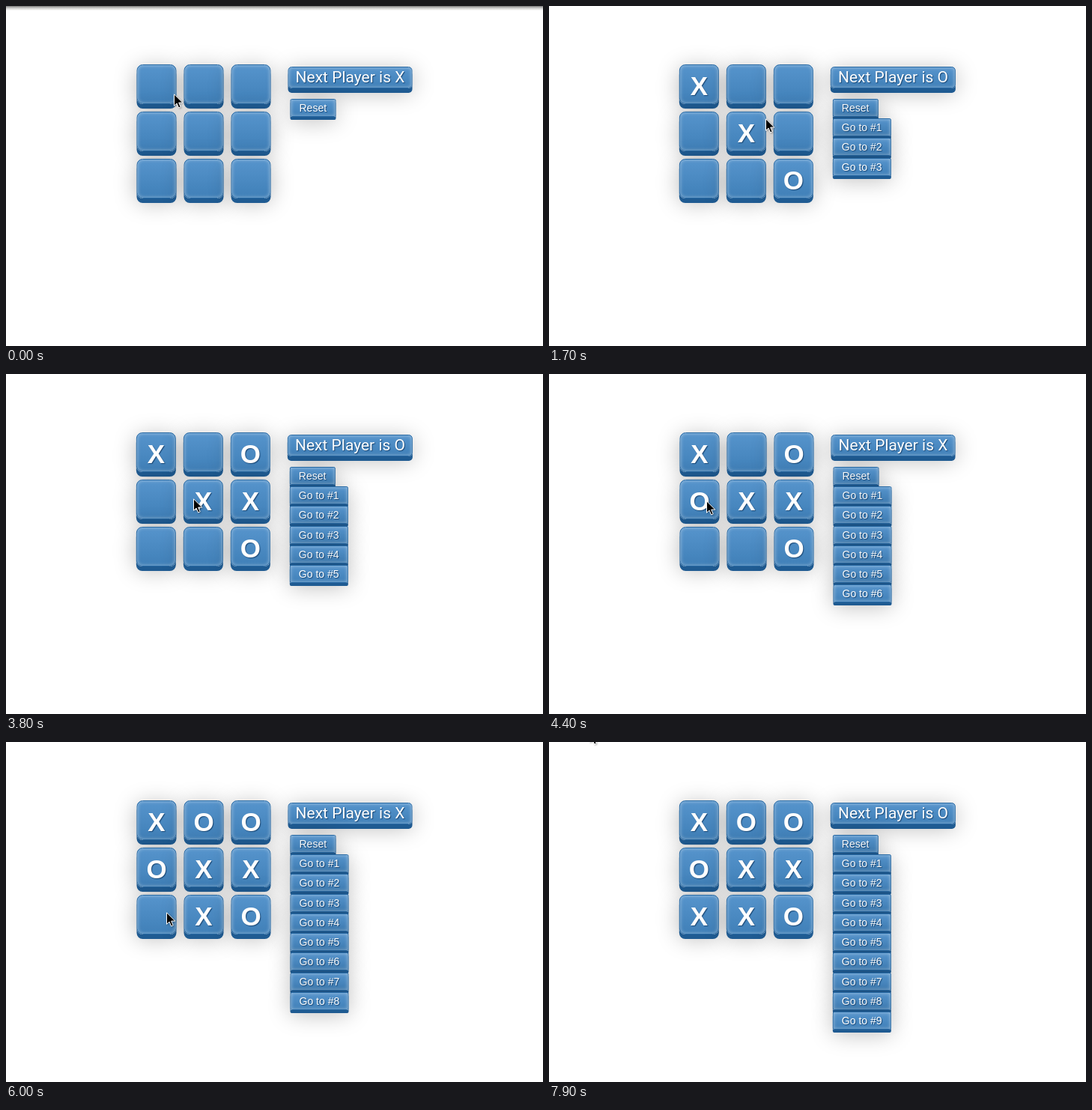
Write an HTML page that moves like this. It is 717 px wide and 454 px high and loops after 8000 ms.

```html
<!DOCTYPE html>
<html lang="en">
<head>
<meta charset="utf-8">
<title>Tic-tac-toe</title>
<style>
html, body { margin: 0; width: 100%; height: 100%; overflow: hidden; background: #fff; }
#stage { position: relative; width: 717px; height: 454px; overflow: hidden; }
#bar { position: absolute; width: 100%; height: 6px; background: linear-gradient(#777, #c4c4c4 40%, #fff); }
#game { position: absolute; left: 0; top: 0; }
#game div {
  position: absolute; box-sizing: border-box; color: #fff; text-align: center; white-space: nowrap;
  border: 1px solid #2668a3; background: linear-gradient(#5694cc, #4080b8);
  text-shadow: 1px 1px 1px #1c4a78;
  box-shadow: inset 0 0 5px rgba(255,255,255,.45), 0 var(--d) 0 #1f5b92, 0 5px 30px rgba(0,0,0,.28);
}
#game .cell { --d: 6px; width: 53px; height: 53px; border-radius: 8px; font: bold 35px/55px "Liberation Sans", Arial, sans-serif; }
#game .status { --d: 6px; left: 202px; top: 81px; height: 29px; border-radius: 5px; font: 21px/27px Roboto, sans-serif; }
#game .step { --d: 4px; left: 205px; height: 24px; padding: 0 11px; border-radius: 2px; font: 14px/22px "Liberation Sans", Arial, sans-serif; }
#cursor { position: absolute; left: 0; top: 0; overflow: visible; filter: drop-shadow(1px 1px 1px rgba(0,0,0,.3)); }
</style>
</head>
<body>
<div id="stage">
  <div id="bar"></div>
  <div id="game"></div>
  <svg id="cursor" width="13" height="20">
    <path d="M.5 .8V16.3L4.1 13L6.6 19L9.2 17.9L6.7 12.1H11.8Z" fill="#000" stroke="#fff"/>
  </svg>
</div>
<script>
const LOOP = 8000, TICK = 100, TRAVEL = 5;
const LEFT = 174, TOP = 78, PITCH = 63;
const $ = id => document.getElementById(id);

// pointer stops: tick of leaving, tip position, and whether it clicks there
const stops = [
  [0, 224, 117], [3, 196, 109, true], [10, 325, 242, true], [15, 270, 172, true],
  [21, 325, 110, true], [27, 275, 230], [35, 324, 160, true], [44, 210, 169, true],
  [48, 268, 230, true], [55, 264, 112, true], [61, 214, 227, true],
  [71, 370, 273], [80, 54, -16]
].map(([tick, x, y, click]) => ({ tick, x, y, click }));

// each click marks the cell under the pointer
const moves = stops.filter(s => s.click).map(({ tick, x, y }) => ({
  tick, cell: Math.floor((x - LEFT) / PITCH) + 3 * Math.floor((y - TOP) / PITCH)
}));

function add(cls, top, text = "") {
  const el = document.createElement("div");
  el.className = cls;
  el.style.top = top + "px";
  el.textContent = text;
  $("game").append(el);
  return el;
}

const cells = Array.from({ length: 9 }, (_, i) => {
  const el = add("cell", TOP + Math.floor(i / 3) * PITCH);
  el.style.left = i % 3 * PITCH + "px";
  return el;
});
const status = add("status", 81);
const steps = Array.from({ length: 10 }, (_, i) =>
  add("step", 123.9 + i * 26.25, i ? "Go to #" + i : "Reset"));

// leave a stop at its tick, ease to the next and wait there
function pointer(tick) {
  const i = stops.findIndex(s => s.tick > tick), a = stops[i - 1], b = stops[i];
  const u = Math.min(1, (tick - a.tick) / Math.min(TRAVEL, b.tick - a.tick));
  const k = u * u * (3 - 2 * u);
  return [a.x + (b.x - a.x) * k, a.y + (b.y - a.y) * k].map(Math.round);
}

let shown = -1;
function draw(now) {
  requestAnimationFrame(draw);
  const tick = Math.floor(now % LOOP / TICK);
  if (tick === shown) return;
  shown = tick;

  const played = moves.filter(m => m.tick <= tick);
  const marks = Array(9).fill("");
  played.forEach(({ cell }, i) => marks[cell] = "XO"[i % 2]);
  cells.forEach((el, i) => el.textContent = marks[i]);
  steps.forEach((el, i) => el.style.display = i <= played.length ? "" : "none");

  // the wider "O" label moves the centred layout slightly left
  const next = played.length % 2, width = next ? 369.3 : 368;
  status.textContent = "Next Player is " + "XO"[next];
  status.style.width = width - 202 + "px";
  $("game").style.transform = `translateX(${(717 - width) / 2}px)`;

  $("bar").style.display = played.length ? "none" : "";
  const [x, y] = pointer(tick);
  $("cursor").style.transform = `translate(${x}px, ${y}px)`;
}
draw(performance.now());
</script>
</body>
</html>
```
